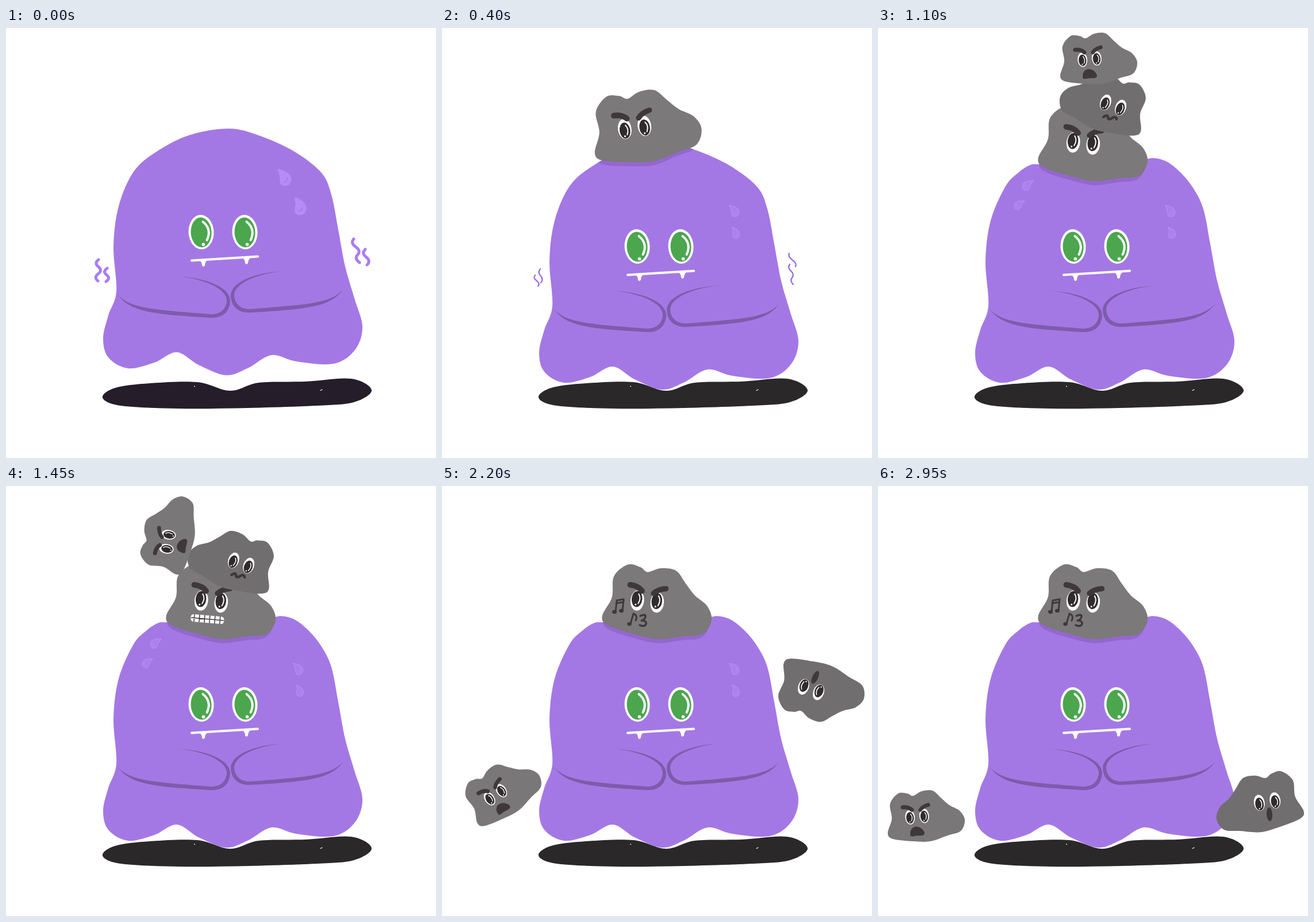
An HTML page for the animation above (3.05 s loop, 748 by 748 pixels).

```html
<!DOCTYPE html>
<html lang="en">
<head>
<meta charset="utf-8">
<title>Ghost and rocks</title>
<style>
html, body { margin: 0; width: 100%; height: 100%; overflow: hidden; background: #fff; }
svg { display: block; width: 100%; height: 100%; }
</style>
</head>
<body>
<svg id="stage" viewBox="0 0 748 748"></svg>
<script>
const LOOP = 3050, STEP = 50;
const INK = '#3f383b', PURPLE = '#a478e4', DROP = '#b78afa';

// Closed smooth curve through "x y x y ..." points
function smooth(text) {
  const v = text.trim().split(/\s+/).map(Number), n = v.length / 2;
  const at = i => [v[2 * ((i + n) % n)], v[2 * ((i + n) % n) + 1]];
  let d = 'M' + at(0);
  for (let i = 0; i < n; i++) {
    const [a, b, c, e] = [at(i - 1), at(i), at(i + 1), at(i + 2)];
    const c1 = b.map((p, j) => p + (c[j] - a[j]) / 6);
    const c2 = c.map((p, j) => p - (e[j] - b[j]) / 6);
    d += `C${c1} ${c2} ${c}`;
  }
  return d + 'Z';
}

const fill = (d, color, more = '') => `<path d="${d}" fill="${color}" ${more}/>`;
const line = (d, color, w) =>
  `<path d="${d}" fill="none" stroke="${color}" stroke-width="${w}" stroke-linecap="round" stroke-linejoin="round"/>`;
const oval = (x, y, rx, ry, color, rot = 0) =>
  `<ellipse cx="${x}" cy="${y}" rx="${rx}" ry="${ry}" fill="${color}" transform="rotate(${rot} ${x} ${y})"/>`;
const group = (id, body) => `<g id="${id}">${body}</g>`;

// Ghost: one skirt, with a round top or one dented to height y
const SKIRT = `566 315 578 376 590 440 606 495 620 545 607 585 570 609 505 605 462 594 420 617
  382 629 335 611 297 589 258 607 212 617 178 598 169 565 178 525 192 483 187 405 196 335 222 275 `;
const DOME = smooth(SKIRT + '262 240 320 211 388 200 440 212 500 239 548 276');
const dent = y => smooth(SKIRT + `245 251 263 ${y + 12} 276 ${y + 10} 305 ${y + 12} 370 ${y + 25}
  445 ${y + 13} 468 ${y + 1} 486 ${y} 505 ${y + 7} 526 251 548 278`);
const BODIES = [[1100, dent(227)], [750, dent(218)], [0, DOME]];

const ghostEye = x =>
  oval(x, 380, 22, 30, '#fff', -3) + oval(x, 380.5, 18, 26, '#4ba64e', -3) +
  line(`M${x + 3} 362Q${x + 19} 375 ${x + 10} 394`, '#fff', 4) + oval(x + 4, 401.5, 2.8, 2.8, '#fff');
const fang = (x, y) => fill(`M${x - 7} ${y}q5 3 5 9q2 4 5 0q0-6 5-10z`, '#fff');
const face = ghostEye(339.5) + ghostEye(415.5) +
  line('M323 429.5Q380 426 438 422.5', '#fff', 4) + fang(343, 429) + fang(418, 425);

const arm = fill(`M298 457C350 460 390 476 390 500C389 520 375 530 356 529C255 523 215 519 194 488
  C215 513 255 515 356 523C372 523 383 515 384 499C384 480 350 462 298 457Z`, '#7e5bab');
const arms = arm + `<g transform="translate(781 -9) scale(-1 1)">${arm}</g>`;

// Sweat and tremble marks
const drop = (x, y, size = 1, rot = 0, w = 1.6, flip = 1) =>
  `<g transform="translate(${x} ${y}) rotate(${rot}) scale(${size * flip} ${size})">` +
  fill('M0 0C6 1 17 3 17 12C17 19 10 21 6 18C3 15 6 6 0 0Z', w > 2 ? DROP : '#ab7fec',
    `stroke="${DROP}" stroke-width="${w}" stroke-linejoin="round"`) +
  line('M13 9Q14 14 9 16', w > 2 ? PURPLE : DROP, 1.3) + '</g>';
const wave = (x, y, dx, dy, w, color) => {
  const n = Math.round(dy / 12), sx = dx / n, sy = dy / n;
  return line(`M${x} ${y}q${sx / 2 - w - 3} ${sy / 2} ${sx} ${sy}` + `t${sx} ${sy}`.repeat(n - 1), color, w);
};
const marks = (w, color, ...list) => list.map(m => wave(...m, w, color)).join('');

const bigMarks = drop(475, 248, 1.2, 6, 4) + drop(504, 297, 1.2, 16, 4) +
  marks(5, '#a97df4', [161, 403, -1, 37], [176, 418, -2, 23], [605, 367, 10, 41], [625, 385, 3, 27]);
const tremble = marks(2.4, '#9b6fe2', [162, 430, 5, 19], [171, 419, 1, 24], [604, 392, 11, 23], [605, 411, 6, 35]);
const sweat = drop(499.5, 308.5) + drop(505, 346.5, .9, 14);
const leftSweat = drop(270, 266, .95, 12, 1.6, -1) + drop(255, 301, .9, 14, 1.6, -1);

// All rocks share one outline and eyes, centred between the eyes
const ROCK = smooth(`-51 29 -44 4 -47 -22 -33 -40 -17 -40 -7 -36 8 -44 27 -45 42 -32 56 -20 74 -10
  83 6 76 25 53 33 23 43 -8 43 -42 39`);
const eye = (x, dy) => oval(x, 0, 8.4, 12.6, '#fff') +
  `<g class="pupil" transform="translate(0 ${dy})">` + oval(x, 0, 6.6, 10, '#302b2d') +
  line(`M${x + 1.5}-6.5q4 5 .5 12`, '#fff', 1.4) + oval(x - 1, 7, 1.1, 1.1, '#fff') + '</g>';
const brows = line('M-25-16Q-15-17-9-11.5', INK, 7) + line('M5.5-11.5Q10-18 19.5-20.5', INK, 6.5);
const rock = (color, size, tilt, flip, dy, extra = '') =>
  `<g transform="rotate(${tilt}) scale(${size})">` + fill(ROCK, color, `transform="scale(${flip} 1)"`) +
  `<g transform="rotate(${-6 * flip})">${eye(-12.4, dy)}${eye(12.4, dy)}</g>${extra}</g>`;

const bars = Array.from({ length: 6 }, (_, i) => `M${-27 + 9 * i} 25v12`).join('');
const teeth = '<g transform="rotate(5)"><rect x="-33" y="24.5" width="58" height="13" rx="5" fill="#fff"/>' +
  line(bars + 'M-32 31h56', INK, 1.5) + '</g>';
const song =
  line('M-55 17L-53-2L-41-4L-43 15M-54 3L-42 1', INK, 3) + oval(-57, 18, 4, 3.2, INK) + oval(-45, 16, 4, 3.2, INK) +
  line('M-29 38L-24 21Q-16 24-20 33', INK, 3) + oval(-31, 39, 3.8, 3.2, INK) +
  line('M-12 25Q-3 21-3 26Q-4 32-10 33Q-1 33-2 39Q-5 45-13 41', INK, 3.4);

const rock1 = rock('#7b7979', 1.4, 12, 1, 0, brows) + group('teeth', teeth) + group('song', song);
const rock2 = rock('#716e6f', 1.12, -15, -1, 2) +
  group('worry', line('M-5 26Q-1 18 2 23T9 21T17 19', INK, 4.5)) + group('gasp', oval(4, 22, 5, 12, INK, -4));
const rock3 = rock('#7a7778', 1, 0, 1, 1, brows + fill('M-12 31C-12 12 8 15 13 28C13 36 3 32-5 34Q-12 36-12 31Z', INK));

const GROUND = smooth(`168 643 190 626 250 618 333 616 390 631 440 617 520 615 600 610 636 630
  605 651 540 657 420 661 300 662 200 657`);

document.getElementById('stage').innerHTML =
  '<clipPath id="clip"><path id="mask"/></clipPath>' +
  fill(GROUND, INK, 'id="ground"') + line('M327.5 623l1 .5M547 630.5l3-1.5', '#fff', 1.2) +
  group('ghost', fill('', PURPLE, 'id="body"') + arms + face) +
  `<g clip-path="url(#clip)"><g id="cast">${fill(ROCK, '#9467d0', 'transform="rotate(12) scale(1.36 1.4)"')}</g></g>` +
  Object.entries({ bigMarks, tremble, sweat, leftSweat, rock1, rock2, rock3 })
    .map(([id, body]) => group(id, body)).join('');

// Moves: start, duration, then x, y and turn to reach
const MOVES = {
  rock1: [[400, 0, 335, 173, -15], [750, 0, 352, 187, 0], [1100, 0, 357, 201, 0]],
  rock2: [[750, 0, 419, 115, 28], [1100, 0, 409, 134, 28], [1700, 100, 485, 168, 80],
    [1800, 400, 642, 354, 209], [2450, 200, 677, 549, 360]],
  rock3: [[1100, 0, 368, 54, 0], [1350, 100, 281, 97, -75], [1700, 100, 225, 189, -208],
    [1800, 400, 93, 537, -388], [2450, 200, 68, 575, -360]]
};

function pose(moves, t) {
  let now = null;
  for (const [start, span, ...to] of moves) {
    if (t < start) break;
    const p = span ? Math.min(1, (t - start) / span) : 1;
    const fall = p * (1 + p) / 2;
    now = to.map((v, i) => p === 1 ? v : now[i] + (v - now[i]) * (i === 1 ? fall : p));
  }
  return now;
}

const el = id => document.getElementById(id);
const set = (id, name, value) => el(id).setAttribute(name, value);
const show = (id, on) => { el(id).style.display = on ? '' : 'none'; };
const pupils = document.querySelectorAll('#rock1 .pupil');

function draw(time) {
  const t = Math.floor((time % LOOP) / STEP) * STEP;
  const during = (a, b) => t >= a && t < b;
  const body = BODIES.find(b => t >= b[0])[1];

  set('ground', 'fill', t < 400 ? '#251d2a' : '#2a2829');
  set('ghost', 'transform', `translate(0 ${t < 400 ? -25 : 0})`);
  set('body', 'd', body);
  set('mask', 'd', body);

  const place = (id, p, dy = 0) => {
    show(id, p);
    if (p) set(id, 'transform', `translate(${p[0]} ${p[1] + dy}) rotate(${p[2]})`);
  };
  for (const id in MOVES) place(id, pose(MOVES[id], t));
  place('cast', pose(MOVES.rock1, t), 7);
  pupils.forEach(g => g.setAttribute('transform', t < 1100 ? 'translate(0 2)' : 'translate(-.6 -1.8)'));

  const flip = during(750, 1100) ? 'translate(776 0) scale(-1 1)' : '';
  set('sweat', 'transform', flip);
  set('tremble', 'transform', flip);
  show('bigMarks', t < 400);
  show('tremble', during(400, 1100));
  show('sweat', during(400, 2500));
  show('leftSweat', during(1100, 1750));
  show('teeth', during(1400, 2000));
  show('song', t >= 2000);
  show('worry', t < 1750);
  show('gasp', t >= 1750);
}

const start = performance.now();
function tick() {
  draw(performance.now() - start);
  requestAnimationFrame(tick);
}
tick();
</script>
</body>
</html>
```
